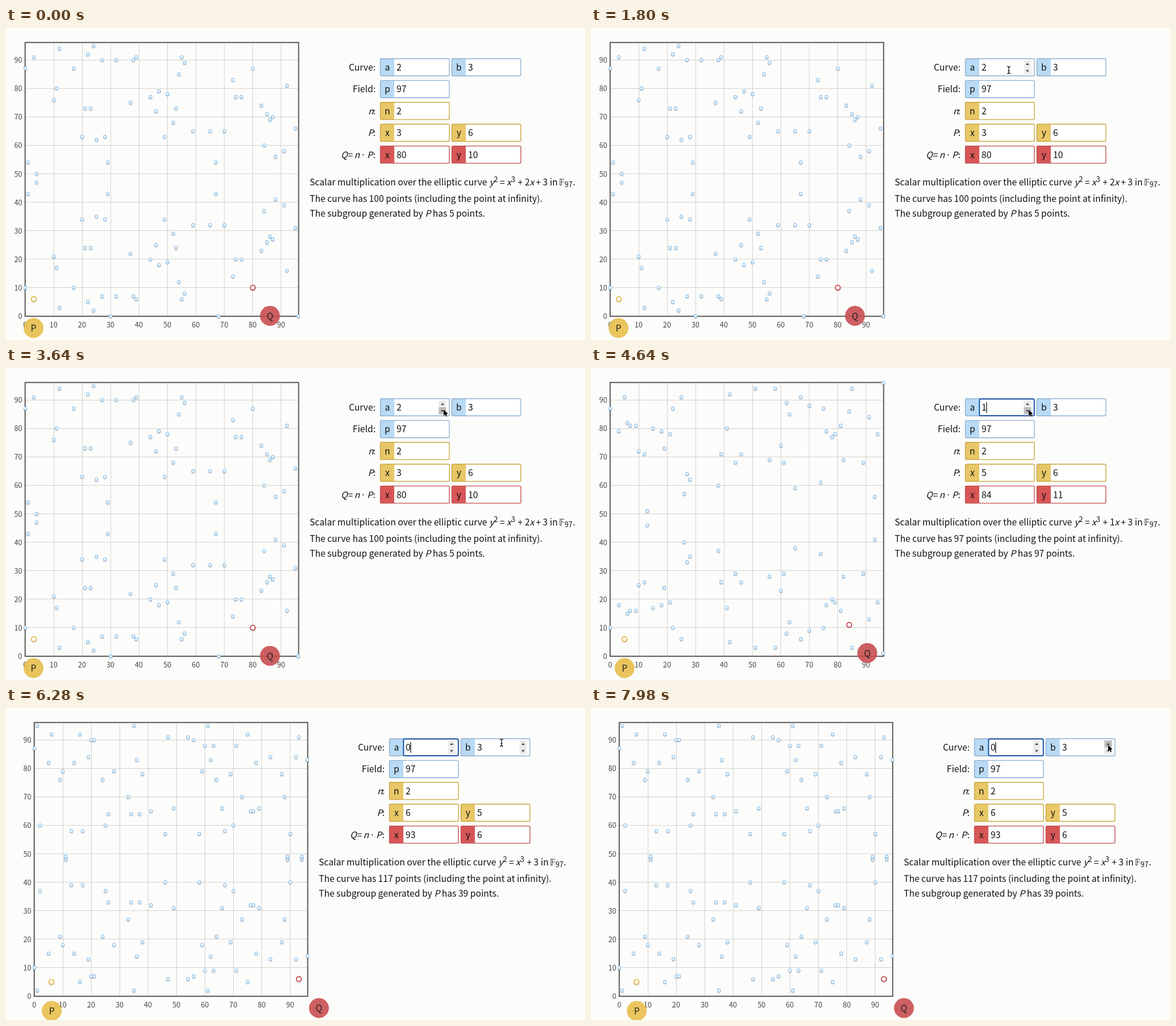
These frames come from a looping animation (1020 by 549 pixels, 8000 ms). An HTML page with a canvas:

```html
<!DOCTYPE html>
<html lang="en">
<head>
<meta charset="utf-8">
<title>Scalar multiplication over a finite field</title>
<style>
html, body { margin: 0; width: 100%; height: 100%; overflow: hidden; background: #fcfcfb; }
canvas { display: block; }
</style>
</head>
<body>
<canvas id="stage" width="1020" height="549"></canvas>
<script>
const ctx = document.getElementById('stage').getContext('2d');
const FONT = '"Noto Sans CJK JP", "Noto Sans CJK SC", "Noto Sans CJK", "Noto Sans", sans-serif';
const LOOP = 8000, MOD = 97, SIZE = 15.68, UNIT = 5.01;
const BLUE = { fill: '#b8daf5', edge: '#8fb0d0' };
const GOLD = { fill: '#e8c768', edge: '#c9a741' };
const RED = { fill: '#d75656', edge: '#c05252' };

// badge: centre of the round name tag, in page coordinates
const states = [
  { from: 0, a: 2, shift: 0, P: [3, 6], Q: [80, 10], order: 100, sub: 5,
    badgeP: [48.5, 528], badgeQ: [465, 506.5] },
  { from: 3960, a: 1, shift: 0, P: [5, 6], Q: [84, 11], order: 97, sub: 97,
    badgeP: [59.2, 528], badgeQ: [486.7, 501.5] },
  { from: 5250, a: 0, shift: 16, P: [6, 5], Q: [93, 6], order: 117, sub: 39,
    badgeP: [80.6, 533], badgeQ: [551.3, 528] }
];
for (const s of states) {
  s.points = [];
  for (let x = 0; x < MOD; x++)
    for (let y = 0; y < MOD; y++)
      if ((y * y - x * x * x - s.a * x - 3) % MOD === 0) s.points.push([x, y]);
}

// time, x, y of the pointer
const path = [
  [400, 715, 560], [1500, 736, 74], [1900, 736, 74], [2500, 771, 73],
  [5500, 771, 73], [6200, 873, 61], [6400, 873, 61], [7000, 911, 65], [LOOP, 911, 65]
];

function pointer(t) {
  if (t < path[0][0]) return [-50, -50];
  const i = path.findIndex(k => t < k[0]);
  const [t0, x0, y0] = path[i - 1], [t1, x1, y1] = path[i];
  const u = (t - t0) / (t1 - t0), e = u * u * (3 - 2 * u);
  return [x0 + (x1 - x0) * e, y0 + (y1 - y0) * e];
}

function text(str, x, y, { size = SIZE, italic = false, align = 'left', color = '#111' } = {}) {
  ctx.font = `${italic ? 'italic ' : ''}${size}px ${FONT}`;
  ctx.textAlign = align;
  ctx.fillStyle = color;
  ctx.fillText(str, x, y);
  return x + ctx.measureText(str).width;
}

function line(x0, y0, x1, y1) {
  ctx.beginPath();
  ctx.moveTo(x0, y0);
  ctx.lineTo(x1, y1);
  ctx.stroke();
}

function shape(pts, fill) {
  ctx.beginPath();
  pts.forEach(([x, y]) => ctx.lineTo(x, y));
  ctx.closePath();
  ctx.fillStyle = fill;
  ctx.fill();
}

const px = x => 34 + x * UNIT;
const py = y => 507 - y * UNIT;

function ring([x, y], r, width, color) {
  const arc = (dy, end, w, stroke) => {
    ctx.beginPath();
    ctx.arc(px(x), py(y) + dy, r, 0, end);
    ctx.lineWidth = w;
    ctx.strokeStyle = stroke;
    ctx.stroke();
  };
  arc(1.9, Math.PI, 1.3, 'rgba(0,0,0,0.1)');
  arc(0.7, Math.PI, 1.3, 'rgba(0,0,0,0.2)');
  ctx.beginPath();
  ctx.arc(px(x), py(y), r, 0, 7);
  ctx.fillStyle = '#fff';
  ctx.fill();
  arc(0, 7, width, color);
}

function badge(name, [x, y], color) {
  ctx.beginPath();
  ctx.arc(x, y, 17.5, 0, 7);
  ctx.fillStyle = color;
  ctx.fill();
  text(name, x, y + 6, { align: 'center', color: '#222' });
}

function plot(s) {
  const tick = { size: 12.7, color: '#444' };
  ctx.lineWidth = 1;
  ctx.strokeStyle = 'rgba(84,84,84,0.25)';
  for (let v = 0; v < MOD; v += 10) {
    if (v) {
      const gx = Math.floor(px(v)) + 0.5, gy = Math.floor(py(v)) + 0.5;
      line(gx, 26, gx, 507);
      line(34, gy, 515, gy);
    }
    text(v, px(v) - 0.3, 527, { ...tick, align: 'center' });
    text(v, 28.5, py(v) + 5, { ...tick, align: 'right' });
  }
  ctx.lineWidth = 1.8;
  ctx.strokeStyle = '#484848';
  ctx.strokeRect(33.7, 25.5, 481.8, 481.8);
  s.points.forEach(p => ring(p, 2.6, 1.6, '#a3cdec'));
  ring(s.P, 4.3, 1.7, '#e2b53c');
  ring(s.Q, 4.3, 1.7, '#c23b3f');
}

function spinner(cx, over, mouseY) {
  ctx.fillStyle = '#ececec';
  ctx.fillRect(cx - 6.5, 57, 13, 24.5);
  if (over) {
    ctx.fillStyle = '#bdbdbd';
    ctx.fillRect(cx - 6.5, mouseY < 69 ? 57 : 69, 13, 12.5);
  }
  shape([[cx - 3, 65], [cx, 61.5], [cx + 3, 65]], '#444');
  shape([[cx - 3, 74], [cx, 77.5], [cx + 3, 74]], '#444');
}

function field(col, row, name, value, { fill, edge }) {
  const x = 659.5 + col * 126, y = 54 + row * 38.4;
  ctx.beginPath();
  ctx.roundRect(x, y, 121.5, 30.3, 2);
  ctx.fillStyle = '#fff';
  ctx.fill();
  ctx.fillStyle = fill;
  ctx.fillRect(x, y, 24.5, 30.3);
  ctx.lineWidth = 1.4;
  ctx.strokeStyle = edge;
  ctx.stroke();
  text(name, x + 12.3, y + 21, { align: 'center' });
  text(value, x + 28.5, y + 21);
}

function form(s, [mx, my]) {
  const right = { align: 'right' }, it = { italic: true };
  text('Curve:', 651, 75, right);
  text('Field:', 651, 113.4, right);
  text('n', 638, 151.8, it);
  text('P', 637.5, 190.2, it);
  text('Q', 590, 228.6, it);
  text('=', 602.5, 228.6);
  text('n', 613.5, 228.6, it);
  text('·', 625, 228.6);
  text('P', 636, 228.6, it);
  [151.8, 190.2, 228.6].forEach(y => text(':', 651, y, right));

  const double = [3, 4];
  const S = [s.P, s.Q];
  field(0, 0, 'a', s.a, BLUE);
  field(1, 0, 'b', 3, BLUE);
  field(0, 1, 'p', MOD, BLUE);
  field(0, 2, 'n', 2, GOLD);
  double.forEach((row, i) => {
    field(0, row, 'x', S[i][0], [GOLD, RED][i]);
    field(1, row, 'y', S[i][1], [GOLD, RED][i]);
  });

  const focused = s !== states[0];
  let mode = my > 260 && my < 336 ? 'text' : 'arrow';
  for (let col = 0; col < 2; col++) {
    const left = 684 + col * 126, cx = left + 85;
    const hover = mx > left && mx < left + 97 && my > 54 && my < 85;
    const over = hover && Math.abs(mx - cx) < 7;
    if (hover) mode = over ? 'arrow' : 'text';
    if (hover || (focused && !col)) spinner(cx, over, my);
  }
  if (focused) {
    ctx.beginPath();
    ctx.roundRect(684.3, 54.5, 96.5, 29.5, 2.5);
    ctx.lineWidth = 2;
    ctx.strokeStyle = '#1c55a5';
    ctx.stroke();
    ctx.fillStyle = '#000';
    ctx.fillRect(696.3, 60, 1.2, 19);
  }
  return mode;
}

function prose(s) {
  const y = 276.7, it = { italic: true }, small = { size: 12.7 };
  text('Scalar multiplication over the elliptic curve', 535, y);
  text('y', 851.5, y, it);
  text('2', 859.5, y - 6, small);
  text('=', 870, y);
  text('x', 882, y, it);
  text('3', 890, y - 6, small);
  text('+', 901.5, y);
  if (s.a) {
    text(s.a, 914, y);
    text('x', 922.5, y, it);
    text('+', 933.5, y);
  }
  const back = s.a ? 0 : 32;
  text('3', 945.5 - back, y);
  text('in', 958 - back, y);
  text('𝔽', 974 - back, y);
  text('97', 984 - back, y + 3.5, small);
  text('.', 998.5 - back, y);
  text(`The curve has ${s.order} points (including the point at infinity).`, 535, 305.5);
  const x = text('The subgroup generated by ', 535, 331.7);
  text(` has ${s.sub} points.`, text('P', x, 331.7, it), 331.7);
}

function cursor([x, y], mode) {
  if (mode === 'text') {
    const beam = (w, color) => {
      ctx.lineWidth = w;
      ctx.strokeStyle = color;
      line(x, y - 5, x, y + 5);
      line(x - 1.5, y + 1.5, x + 1.5, y + 1.5);
      for (const d of [-1, 1]) {
        ctx.beginPath();
        ctx.moveTo(x - 3, y + d * 6.3);
        ctx.quadraticCurveTo(x, y + d * 6.3, x, y + d * 4);
        ctx.quadraticCurveTo(x, y + d * 6.3, x + 3, y + d * 6.3);
        ctx.stroke();
      }
    };
    beam(2.6, 'rgba(255,255,255,0.8)');
    beam(1.2, '#111');
    return;
  }
  const arrow = [[0, 0], [0, 11], [2.5, 8.7], [4.2, 12.5], [6, 11.7], [4.4, 8], [7.8, 8]]
    .map(([dx, dy]) => [x + dx, y + dy]);
  shape(arrow, '#000');
  ctx.lineWidth = 0.9;
  ctx.strokeStyle = '#fff';
  ctx.stroke();
  shape(arrow, '#000');
}

function draw(now) {
  const t = now % LOOP;
  const s = states.filter(k => t >= k.from).pop();
  const mouse = pointer(t);
  ctx.fillStyle = '#fcfcfb';
  ctx.fillRect(0, 0, 1020, 549);
  ctx.save();
  ctx.translate(s.shift, 0);
  plot(s);
  const mode = form(s, [mouse[0] - s.shift, mouse[1]]);
  prose(s);
  ctx.restore();
  badge('P', s.badgeP, 'rgba(232,190,76,0.9)');
  badge('Q', s.badgeQ, 'rgba(200,78,80,0.9)');
  cursor(mouse, mode);
}

const start = performance.now();
(function tick() {
  draw(performance.now() - start);
  requestAnimationFrame(tick);
})();
</script>
</body>
</html>
```
